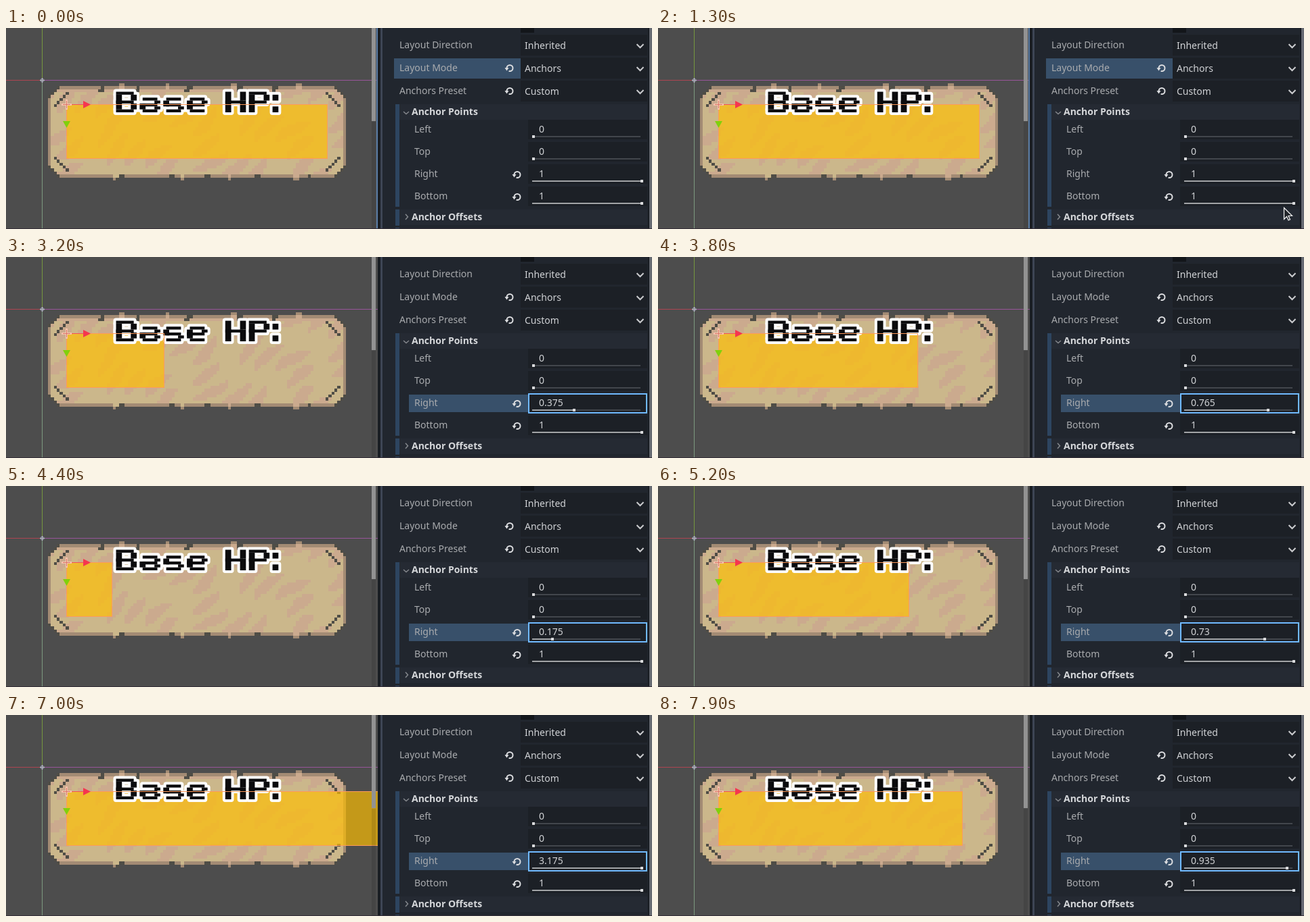
An HTML page with a canvas for the animation above (8000 ms loop, 954x298 px).

```html
<!DOCTYPE html>
<html lang="en">
<head>
<meta charset="utf-8">
<title>Anchor points</title>
<style>
html, body { margin: 0; width: 100%; height: 100%; overflow: hidden; background: #4d4d4d; }
canvas { display: block; }
</style>
</head>
<body>
<canvas id="stage" width="954" height="298"></canvas>
<script>
const g = document.getElementById('stage').getContext('2d');
const LOOP = 8000, STEP = 100, DRAG = 2200;
const U = 4.36; // size of one art pixel

// turning points of the drag: [time, "Right" anchor]
const VALUE = [[2100, 1], [2600, .745], [3100, .31], [3800, .765], [4400, .175], [4600, .11],
  [4700, .11], [5400, .98], [5900, 3.15], [6500, 5.2], [7500, 1.15], [7900, .935]];
// [time, x, y]
const MOUSE = [[1300, 924, 266], [1600, 942, 232], [1700, 942, 232], [1900, 938, 224]];

function at(keys, t, i = 1) {
  const next = keys.findIndex(k => k[0] >= t);
  if (next < 0) return keys[keys.length - 1][i];
  if (next === 0) return keys[0][i];
  const a = keys[next - 1], b = keys[next];
  return a[i] + (b[i] - a[i]) * (t - a[0]) / (b[0] - a[0]);
}

function box(color, x, y, w, h, to = g) {
  to.fillStyle = color;
  to.fillRect(x, y, w, h);
}

function poly(points, fill, stroke, width = 1, close = true) {
  g.beginPath();
  points.forEach(([x, y]) => g.lineTo(x, y));
  if (close) g.closePath();
  if (fill) { g.fillStyle = fill; g.fill(); }
  if (stroke) { g.strokeStyle = stroke; g.lineWidth = width; g.stroke(); }
}

function text(str, x, y, color = '#a9abae', weight = 400) {
  g.font = weight + ' 14px "Noto Sans", sans-serif';
  g.fillStyle = color;
  g.fillText(str, x, y);
}

// Parchment, one canvas pixel per art pixel
function makeParchment() {
  const W = 101, H = 33, c = document.createElement('canvas');
  c.width = W;
  c.height = H;
  const p = c.getContext('2d');
  const rough = x => Math.sin(x * .31 + 1) + Math.sin(x * .83);
  for (let x = 0; x < W; x++) {
    const side = Math.min(x, W - 1 - x);
    const top = rough(x) > 1.5 ? 0 : 1;
    const low = rough(x + 40) > 1.6 ? H - 1 : H - 2;
    for (let y = top; y <= low; y++) {
      const corner = side + Math.min(y - 1, H - 2 - y);
      if (corner < 3) continue;
      const along = x - y, across = x + y * 1.1;
      const streak = Math.sin(across * .7 + 2 * Math.sin(along * .13)) +
        Math.sin(along * .23 + 1.4 * Math.sin(across * .17));
      const rim = y === top || y === low || side === 0;
      const crack = side < 7 && (corner === 3 || corner === 8 && side > 1) ||
        side > 8 && (y <= top + 1 || y >= low) && rough(x * 1.3 + y) > 1.3;
      const color = crack ? '#4f4d46' : rim ? '#a38b74'
        : streak > .5 || y < 3 ? '#cbaa8e' : '#cbb78b';
      box(color, x, y, 1, 1, p);
    }
  }
  return c;
}
const parchment = makeParchment();

// Bars per letter: t, m, b across; l, r upper and L, R lower stems
const LETTERS = { B: 'tmblLrR', a: 'tmbrRL', s: 'tmblR', e: 'tmblLr', H: 'mlLrR', P: 'tmlLr' };

function letterBars(ch) {
  if (ch === ':') return [[0, 1, 2, 2], [0, 5, 2, 2]];
  const parts = LETTERS[ch] || '';
  const cap = ch < 'a', top = cap ? 0 : 2, mid = cap ? 3 : 4;
  const from = top + parts.includes('t'), to = 7 - parts.includes('b');
  const bars = {
    t: [1 - cap, top, 5 + cap, 1], m: [1, mid, 5, 1], b: [1 - cap, 6, 5 + cap, 1],
    l: [0, from, 2, mid - from + 1], r: [5, from, 2, mid - from],
    L: [0, mid, 2, to - mid], R: [5, mid + 1, 2, to - mid - 1]
  };
  if (ch === 'H') bars.R = [5, mid, 2, to - mid];
  return [...parts].map(k => bars[k]);
}

function title() {
  const bars = [];
  let x = 162.5;
  for (const ch of 'Base HP:') {
    for (const [bx, by, w, h] of letterBars(ch))
      bars.push([x + bx * U, 94.5 + by * U, w * U, h * U]);
    x += (ch === ' ' ? 5 : 8) * U;
  }
  g.strokeStyle = '#fff';
  g.lineWidth = 8;
  g.lineJoin = 'round';
  bars.forEach(b => g.strokeRect(...b));
  g.lineJoin = 'miter';
  bars.forEach(b => box('#0b0b0d', ...b));
}

function viewport(v, dragging) {
  g.save();
  g.beginPath();
  g.rect(0, 0, 549, 298);
  g.clip();
  box('#4d4d4d', 0, 0, 549, 298);

  g.imageSmoothingEnabled = false;
  g.drawImage(parchment, 62, 82, 101 * U, 33 * U);
  const w = 386 * v;
  box('rgba(255,191,0,.67)', 89, 113, w, 81);
  title();

  // axes and canvas border
  box('#76983f', 53, 0, 1, 77);
  box('#7c9a80', 53, 77, 1, 221);
  box('#ad4552', 0, 77, 53, 1);
  box('#98559a', 53, 77, 496, 1);
  g.strokeStyle = '#9799ae';
  g.lineWidth = 1;
  g.beginPath();
  g.arc(53.5, 77.5, 2.5, 0, 7);
  g.stroke();
  box('#c4c5d2', 50, 77, 7, 1);
  box('#c4c5d2', 53, 74, 1, 7);

  // selection and move handles
  g.strokeStyle = '#fd9a5c';
  g.strokeRect(89.5, 113.5, Math.round(w) - 1, 80);
  box('#f4515b', 96, 113, 19, 1);
  poly([[114, 108], [125, 113.5], [114, 119]], '#f5364f');
  poly([[84, 138], [95, 138], [89.5, 148]], '#80d00c');
  box('#f6c5b0', 82, 112, 15, 3);
  box('#f6c5b0', 88, 106, 3, 15);
  box('#d8796a', 84, 113, 11, 1);
  box('#d8796a', 89, 108, 1, 11);

  box('rgba(0,0,0,.1)', 540, 139, 6, 159);
  box('#929292', 540, 0, 6, 138);
  if (!dragging) box('#5a7da6', 547, 0, 2, 298);
  g.restore();
}

function reset(x, y) {
  g.strokeStyle = '#dcdde0';
  g.lineWidth = 2;
  g.beginPath();
  g.arc(x + 1, y + .5, 4.5, Math.PI, Math.PI * 2.6);
  g.stroke();
  poly([[x - 6.5, y], [x - .5, y], [x - 3.5, y + 4.5]], '#dcdde0');
}

function dropdown(label, value, y, canReset, active) {
  if (active) box('#38506a', 573, y - 14, 187, 30);
  box('#1c2026', 760, y - 15, 187, 31);
  text(label, 581, y + 5);
  text(value, 766, y + 6, '#d0d2d5');
  if (canReset) reset(743, y);
  poly([[931.5, y - 1], [936.5, y + 4], [941.5, y - 1]], null, '#cccdd0', 2, false);
}

function slider(label, v, y, canReset, active) {
  if (active) box('#38506a', 595, y - 12, 176, 26);
  box('#1c2026', 771, y - 14, 176, 29);
  text(label, 603, y + 5);
  text(String(v), 787, y + 5, '#d0d2d5');
  if (canReset) reset(754, y + 1);
  const x = 779 + 160 * Math.min(v, 1);
  box('#42464c', 777, y + 10, 160, 2);
  box('#a2a4a7', 777, y + 10, x - 777, 2);
  box('#d9dadc', Math.round(x) - 2, y + 9, 4, 4);
  if (active) {
    g.strokeStyle = '#70baff';
    g.lineWidth = 2;
    g.strokeRect(772, y - 13, 174, 28);
  }
}

function section(label, y, open) {
  box('#252a33', 581, y - 11, 366, 23);
  text(label, 599, y + 5, '#d5d7da', 700);
  const arrow = open ? [[587, y], [591, y + 3.5], [595, y]]
    : [[590, y - 4], [593.5, y], [590, y + 4]];
  poly(arrow, null, '#85888d', 1.5, false);
}

function inspector(v, dragging) {
  box('#191d23', 549, 0, 405, 298);
  box('#3d4554', 553, 0, 3, 298);
  box('#21262e', 556, 0, 392, 298);
  box('#666a71', 950, 0, 4, 298);
  box('#13161a', 760, 0, 20, 7);
  dropdown('Layout Direction', 'Inherited', 25, false, false);
  dropdown('Layout Mode', 'Anchors', 59, true, !dragging);
  dropdown('Anchors Preset', 'Custom', 93, true, false);
  box('#2d4560', 575, 113, 6, 152);
  box('#2d4560', 575, 269, 6, 24);
  section('Anchor Points', 124, true);
  slider('Left', 0, 150, false, false);
  slider('Top', 0, 183, false, false);
  slider('Right', v, 216, true, dragging);
  slider('Bottom', 1, 249, true, false);
  section('Anchor Offsets', 280, false);
  box('#2d4560', 575, 296, 6, 2);
}

function cursor(x, y) {
  const shape = [[0, 0], [0, 17], [4, 13], [6.5, 18.5], [9, 17.5], [6.5, 12], [12, 12]];
  poly(shape.map(([a, b]) => [x + .5 + a, y + .5 + b]), '#22252a', '#f4f4f4', 1.2);
}

function draw(now) {
  const t = Math.floor(now % LOOP / STEP) * STEP;
  const v = +(Math.round(at(VALUE, t) * 200) / 200).toFixed(3);
  const dragging = t >= DRAG;
  viewport(v, dragging);
  inspector(v, dragging);
  box('#352f38', 0, 297, 954, 1);
  if (t >= 1300 && !dragging) cursor(at(MOUSE, t), at(MOUSE, t, 2));
  requestAnimationFrame(draw);
}
requestAnimationFrame(draw);
</script>
</body>
</html>
```
